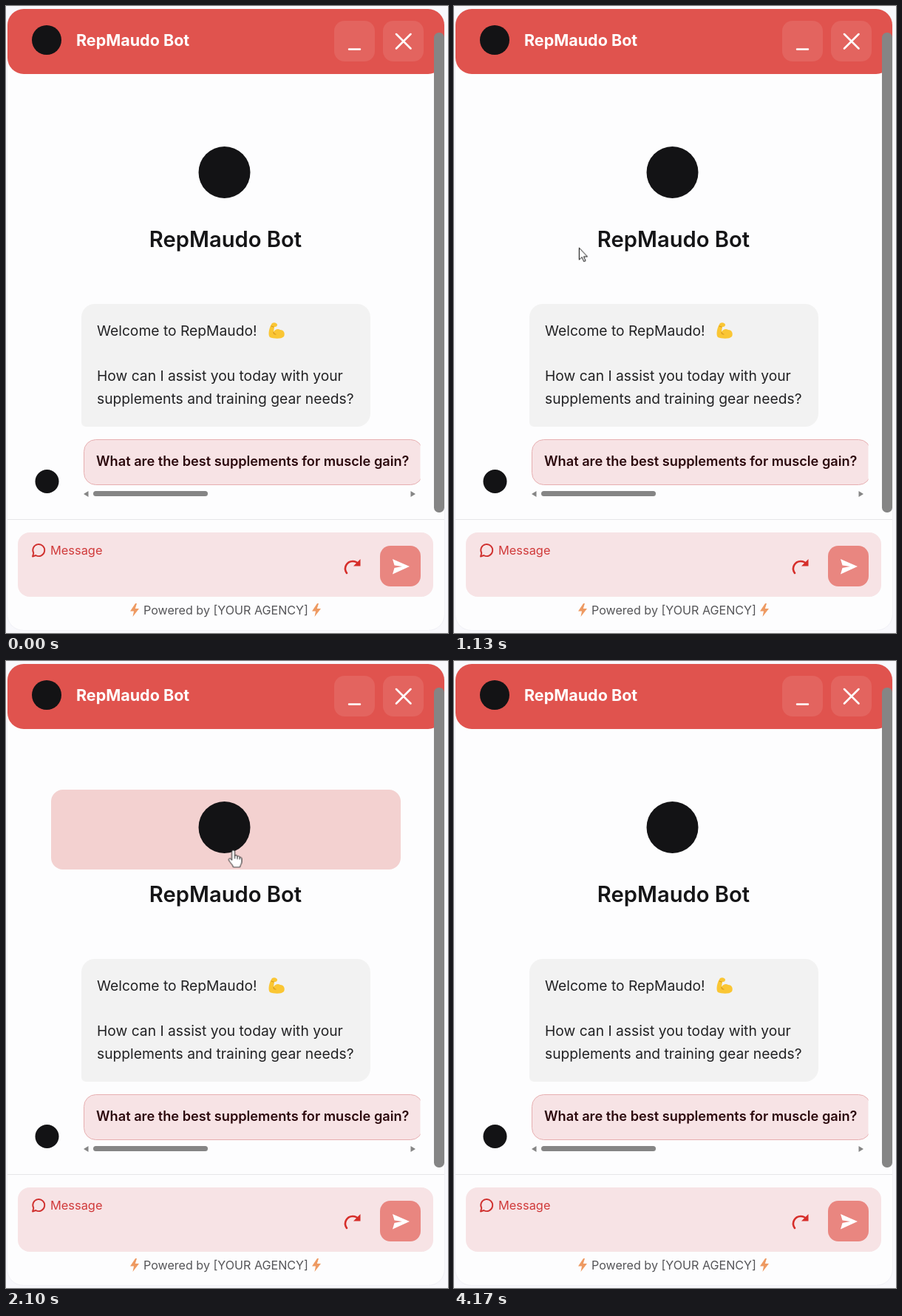
An HTML page for the animation above (4.21 s loop, 598 px wide and 848 px high).

```html
<!DOCTYPE html>
<html lang="en">
<head>
<meta charset="utf-8">
<title>RepMaudo Bot</title>
<style>
  html, body { margin: 0; width: 100%; height: 100%; overflow: hidden; background: #f8f8fc; }
  svg { display: block; width: 598px; height: 848px; }
  text { font-family: Inter, "Open Sans", sans-serif; font-size: 19.25px; fill: #222224; }
  .title { font-size: 21.5px; font-weight: 700; fill: #fff; }
  .name { font-size: 29.2px; font-weight: 600; fill: #151517; text-anchor: middle; }
  .chip { font-size: 18.2px; font-weight: 600; fill: #2b080c; }
  .hint { font-size: 16.4px; fill: #d03a3a; }
  .foot { font-size: 16.1px; fill: #555558; }
  .logo { fill: #131315; }
  .bar { fill: #858585; }
  .line { fill: none; stroke-linecap: round; stroke-linejoin: round; }
  .cursor { fill: #fff; stroke: #111; stroke-linejoin: round; }
  #card, #mover, #hand { opacity: 0; }
</style>
</head>
<body>
<svg viewBox="0 0 598 848">
  <defs>
    <clipPath id="chipClip"><rect x="100" y="580" width="460.5" height="75"/></clipPath>
    <path id="bolt" d="M7 0 0 10.5h5L3.5 18 12 7H6.8L9 0Z" fill="#ee9a62"/>
  </defs>

  <!-- panel and header -->
  <rect x="1.5" y="4.5" width="592" height="840" rx="22" fill="#fdfdfe" stroke="#f1f1f6"/>
  <rect x="2" y="4" width="591" height="88" rx="22" fill="#e0534e"/>
  <circle class="logo" cx="55" cy="46" r="20"/>
  <text class="title" x="95" y="54">RepMaudo Bot</text>
  <g fill="#e3645f">
    <rect x="444" y="20" width="55" height="55" rx="14"/>
    <rect x="510" y="20" width="55" height="55" rx="14"/>
  </g>
  <path class="line" d="M464 58.5h15M528 38l19.5 19.5M547.5 38 528 57.5" stroke="#fff" stroke-width="2.5"/>

  <!-- greeting -->
  <rect id="card" x="61" y="174" width="473" height="108" rx="16" fill="#f3d1d0"/>
  <circle class="logo" cx="295.5" cy="225" r="35"/>
  <text class="name" x="297" y="326">RepMaudo Bot</text>

  <path d="M120 403H475a18 18 0 0 1 18 18V551a18 18 0 0 1-18 18H108a6 6 0 0 1-6-6V421a18 18 0 0 1 18-18Z" fill="#f2f2f2"/>
  <text x="123" y="446">Welcome to RepMaudo!</text>
  <g transform="translate(355 428)">
    <path d="M5 1c3-2 7 0 7 2 0 3-3 3-4 3l-1 7c2-4 6-5 9-3 5 0 7 5 5 9-4 4-14 3-19 1C-1 17 1 6 5 1Z" fill="#fac634"/>
    <path class="line" d="M7 13c0 2 1 3 3 3M7 6 4 5" stroke="#d99a20" stroke-width="1.2"/>
  </g>
  <text x="123" y="507">How can I assist you today with your</text>
  <text x="123" y="538">supplements and training gear needs?</text>

  <!-- suggestion -->
  <rect x="105.5" y="586.5" width="458" height="61" rx="16" fill="#f7e3e5" stroke="#e6aeb0" clip-path="url(#chipClip)"/>
  <text class="chip" x="122" y="622">What are the best supplements for muscle gain?</text>
  <circle class="logo" cx="55.5" cy="643" r="16"/>
  <g class="bar">
    <rect x="118" y="656" width="155" height="7" rx="3.5"/>
    <path d="M105 660l6.5-4v8ZM554 660l-6.5-4v8Z"/>
  </g>

  <!-- message box -->
  <path d="M2 694.5H593" stroke="#e6e6e8"/>
  <rect x="16" y="712" width="562" height="87" rx="16" fill="#f7e3e5"/>
  <path class="line" d="M36 744.5l1.3-4.5a8 8 0 1 1 3 3Z" stroke="#d0302e" stroke-width="1.9"/>
  <text class="hint" x="60" y="742">Message</text>
  <path class="line" d="M461 767c-5-7 0-16 8-16 4 0 6 1 8 4" stroke="#d62e2a" stroke-width="2.6"/>
  <path d="M479.5 748v9.5h-9.5Z" fill="#d62e2a"/>
  <rect x="506" y="730" width="55" height="55" rx="14" fill="#e98680"/>
  <path d="M523 748 546 758 523 768.5 525.5 760 536 758 525.5 756.5Z" fill="#fff"/>

  <use href="#bolt" x="168" y="808"/>
  <text class="foot" x="186" y="823">Powered by [YOUR AGENCY]</text>
  <use href="#bolt" x="414" y="808"/>

  <rect class="bar" x="579" y="36" width="14" height="649" rx="6.5"/>

  <!-- pointer, with its tip at the group's zero point -->
  <g id="mover">
    <path id="arrow" class="cursor" d="M.5.5V16.5l3.7-3.4 2.6 5.9 2.4-1-2.6-5.7h5Z"/>
    <path id="hand" class="cursor" d="M-2 2.5C-2-.5 2-.5 2 2.5V8c1-1.5 3.5-1 3.5 1 1-1.2 3.2-.7 3.2 1.2 1.2-.7 2.8 0 2.8 1.8v4c0 3-2 4-2.5 7.5H0c-.5-3.5-4-5.5-6-9.5-1-2 1.5-3.5 3-1.5l1 1.5ZM2 8v4M5.5 9v3.5M8.7 10.2V13"/>
  </g>
</svg>
<script>
  const LOOP = 4210;
  const $ = id => document.getElementById(id);

  // steps: [time in ms, value]
  const play = (id, prop, steps) => $(id).animate(
    steps.map(([t, v]) => ({ offset: t / LOOP, [prop]: v })),
    { duration: LOOP, iterations: Infinity }
  );
  const at = (x, y) => `translate(${x}px, ${y}px)`;
  const toggle = (on, off, first = 0) => [
    [0, first], [on, first], [on, 1 - first],
    [off, 1 - first], [off, first], [LOOP, first]
  ];

  play("mover", "transform", [
    [0, at(-14, 405)], [970, at(-14, 405)], [1130, at(168, 327)],
    [1270, at(284, 270)], [1400, at(305, 256)], [1700, at(306, 256)],
    [2100, at(307.5, 255.5)], [2800, at(307.5, 255.5)], [2900, at(275, 268)],
    [3030, at(166, 308.5)], [3230, at(-14, 372)], [LOOP, at(-14, 372)]
  ]);
  play("mover", "opacity", toggle(970, 3230));
  play("hand", "opacity", toggle(1240, 2930));
  play("arrow", "opacity", toggle(1240, 2930, 1));

  play("card", "opacity", [
    [0, 0], [1240, 0], [1430, 0.73], [1560, 1],
    [2930, 1], [3030, 0.46], [3180, 0], [LOOP, 0]
  ]);
</script>
</body>
</html>
```
